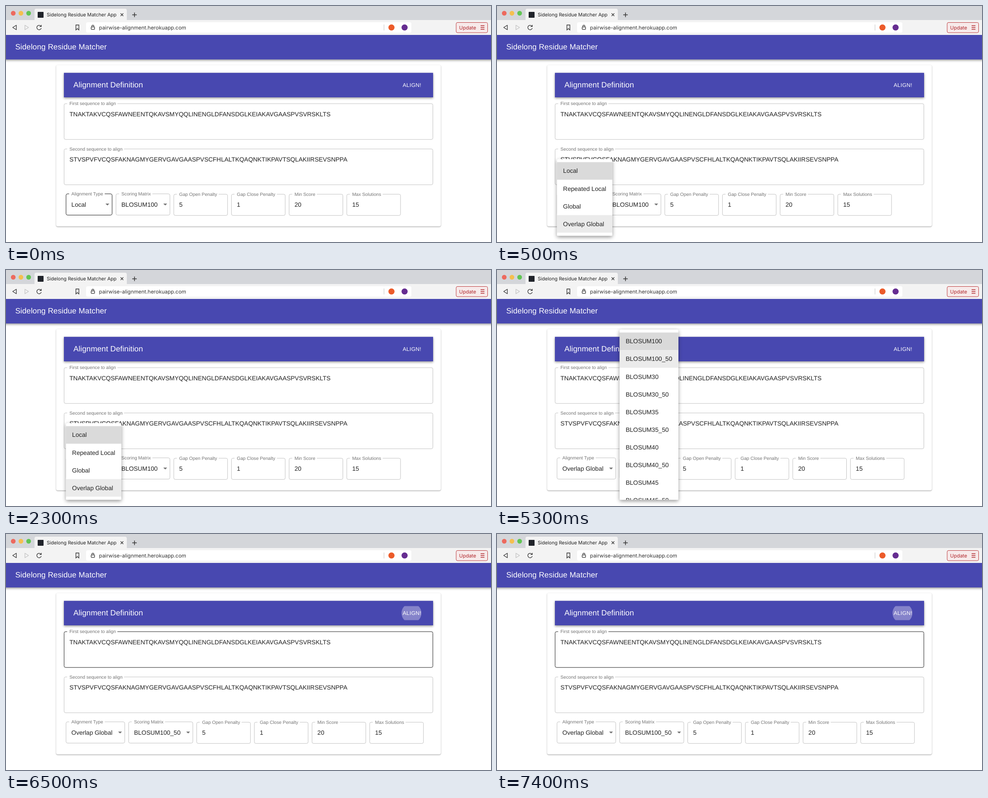
These frames come from a looping animation (1072 px wide and 522 px high, 8000 ms). An HTML page:

```html
<!DOCTYPE html>
<html lang="en">
<head>
<meta charset="utf-8">
<title>Sidelong Residue Matcher</title>
<style>
  html, body { margin: 0; width: 100%; height: 100%; overflow: hidden; background: #fff; }
  svg { display: block; }
  text { font-family: "Liberation Sans", Arial, sans-serif; font-size: 13.6px; fill: #212121;
         text-rendering: geometricPrecision; white-space: pre; }
  .ui { font-family: Inter, sans-serif; }
  .label { font-size: 10.2px; fill: #757575; }
  .title { font-size: 17px; letter-spacing: .0075em; fill: #fff; }
  .button { font-size: 11.9px; letter-spacing: .0286em; fill: #fff; }
  .bar { fill: #4848b0; filter: drop-shadow(0 2px 2.4px rgba(0,0,0,.42)); }
  .card { fill: #fff; filter: drop-shadow(0 1px 1.3px rgba(0,0,0,.4)); }
  .menu { fill: #fff; filter: drop-shadow(0 3px 4px rgba(0,0,0,.42)); }
  .line { fill: none; stroke: #333; stroke-width: 1.3; }
</style>
</head>
<body>
<svg id="stage" width="1072" height="522" viewBox="0 0 1072 522"></svg>
<script>
const stage = document.getElementById('stage');
const pen = document.createElement('canvas').getContext('2d');

const LOOP = 8000;
const STEPS = [
  { at: 0, type: 'Local', matrix: 'BLOSUM100', focus: 'type' },
  { at: 500, type: 'Local', matrix: 'BLOSUM100', menu: 'type' },
  { at: 3500, type: 'Overlap Global', matrix: 'BLOSUM100', menu: 'matrix' },
  { at: 6500, type: 'Overlap Global', matrix: 'BLOSUM100_50', focus: 'first', ripple: true }
];
const TYPES = ['Local', 'Repeated Local', 'Global', 'Overlap Global'];
const MATRICES = ['BLOSUM100', 'BLOSUM100_50'];
for (let n = 30; n <= 45; n += 5) MATRICES.push(`BLOSUM${n}`, `BLOSUM${n}_50`);

const FIRST = 'TNAKTAKVCQSFAWNEENTQKAVSMYQQLINENGLDFANSDGLKEIAKAVGAASPVSVRSKLTS';
const SECOND = 'STVSPVFVCQSFAKNAGMYGERVGAVGAASPVSCFHLALTKQAQNKTIKPAVTSQLAKIIRSEVSNPPA';
const NUMBERS = [['Gap Open Penalty', 5], ['Gap Close Penalty', 1], ['Min Score', 20], ['Max Solutions', 15]];

function measure(s, size) {
  pen.font = `${size}px "Liberation Sans", Arial, sans-serif`;
  return pen.measureText(s).width;
}

const text = (x, y, s, attrs = '') => `<text x="${x}" y="${y}" ${attrs}>${s}</text>`;
const rect = (x, y, w, h, attrs = '') => `<rect x="${x}" y="${y}" width="${w}" height="${h}" ${attrs}/>`;
const dot = (x, y, r, fill) => `<circle cx="${x}" cy="${y}" r="${r}" fill="${fill}"/>`;
const line = (d, attrs = '') => `<path class="line" d="${d}" ${attrs}/>`;

// Outlined box with its label set into the top edge
function field(x, y, w, h, label, value, focused, base = 28) {
  const gap = x + 15.3 + measure(label, 10.2), r = 3.4;
  const edge = `M${gap} ${y}H${x + w - r}q${r} 0 ${r} ${r}V${y + h - r}q0 ${r} ${-r} ${r}` +
    `H${x + r}q${-r} 0 ${-r} ${-r}V${y + r}q0 ${-r} ${r} ${-r}H${x + 6.8}`;
  return `<path d="${edge}" fill="none" stroke="${focused ? '#212121' : '#c2c2c2'}"/>` +
    text(x + 11.9, y + 3.3, label, 'class="label"') + text(x + 11.9, y + base, value);
}

function select(x, w, label, value, focused) {
  return field(x, 415.5, w, 47, label, value, focused) +
    `<path d="M${x + w - 14.6} 437h8.5l-4.25 4.25z" fill="#757575"/>`;
}

function menu(x, y, w, items, hover) {
  const h = 508.3 - y;
  const rows = items.map((s, i) => {
    const top = 6.8 + i * 39.05;
    const fill = i === 0 ? '#dadada' : i === hover ? '#ebebeb' : '#fff';
    return rect(0, top, w, 39.05, `fill="${fill}"`) + text(13.6, top + 24.1, s);
  }).join('');
  return rect(x, y, w, h, 'rx="3.4" class="menu"') +
    `<svg x="${x}" y="${y}" width="${w}" height="${h}" overflow="hidden">${rows}` +
    rect(0, h - 6.8, w, items.length > 4 ? 0 : 6.8, 'fill="#fff"') + '</svg>';
}

function browser() {
  const lights = ['#ed6a5e', '#f5bf4f', '#61c554'].map((c, i) => dot(16 + 17 * i, 16, 5.2, c)).join('');
  return rect(0, 0, 1072, 32, 'fill="#d4d6da"') + rect(0, 31, 1072, 33, 'fill="#f3f3f3"') + lights +
    '<path d="M63 32V10q0-4 4-4H263q4 0 4 4V32z" fill="#f3f3f3"/>' +
    rect(70, 13, 13, 13, 'rx="1" fill="#20232a"') +
    text(90, 23, 'Sidelong Residue Matcher App', 'class="ui" style="font-size:10.6px"') +
    line('M253.3 16.3l6 6m0-6l-6 6') + line('M279 19.5h10m-5-5v10', 'style="stroke-width:1.5"') +
    line('M22.8 42.5v10l-8-5z', 'stroke-linejoin="round"') +
    line('M41.8 42.5v10l8-5z', 'stroke-linejoin="round" style="stroke:#c3c3c3"') +
    line('M77.2 44.6a5 5 0 1 0 .8 4.2M78 41.8v3.6h-3.8') +
    line('M154.5 42h6.6v11l-3.3-3-3.3 3z') +
    rect(177, 36, 719, 23, 'rx="3.5" fill="#fff"') +
    rect(188.3, 46.3, 7.4, 5.4, 'rx="1" class="line"') + line('M189.8 46v-1.5a2.2 2.2 0 0 1 4.4 0v1.5') +
    text(205.5, 51.6, 'pairwise-alignment.herokuapp.com', 'class="ui" style="font-size:11.5px;fill:#333"') +
    rect(835, 41, 1, 13, 'fill="#c4c4c4"') +
    dot(852, 47.5, 6.8, '#ec5b2a') + dot(881, 47.5, 6.8, '#662d91') +
    rect(995, 36.5, 69.5, 22.5, 'rx="3" fill="#f7eaea" stroke="#bd3b3e"') +
    text(1001.5, 51.6, 'Update', 'class="ui" style="font-size:11px;fill:#b0282d"') +
    line('M1049 43.5h8.5m-8.5 4h8.5m-8.5 4h8.5', 'style="stroke:#b0282d"');
}

function scene(step) {
  const x1 = 132.7, gap = 8.6;
  const w1 = Math.max(101.8, 39.1 + measure(step.type, 13.6));
  const x2 = x1 + w1 + gap, w2 = 39.1 + measure(step.matrix, 13.6);
  const x3 = x2 + w2 + gap;

  let out = rect(-10, 64, 1092, 54.2, 'class="bar"') + browser() +
    text(20.4, 96, 'Sidelong Residue Matcher', 'class="title"') +
    rect(111, 130.5, 850, 357, 'rx="3.4" class="card"') +
    rect(128, 147.8, 816, 54.2, 'class="bar"') +
    text(149, 180, 'Alignment Definition', 'class="title"');
  if (step.ripple)
    out += '<svg x="870" y="159.5" width="52" height="31" overflow="hidden">' +
      dot(26.2, 15.5, 22, '#8583ca') + '</svg>';
  out += text(876.8, 179.2, 'ALIGN!', 'class="button"') +
    field(128.4, 216, 815.1, 79.2, 'First sequence to align', FIRST, step.focus === 'first') +
    field(128.4, 316.2, 815.1, 79.2, 'Second sequence to align', SECOND) +
    select(x1, w1, 'Alignment Type', step.type, step.focus === 'type') +
    select(x2, w2, 'Scoring Matrix', step.matrix);
  NUMBERS.forEach(([label, value], i) => {
    out += field(x3 + i * 127.45, 416.3, 118.8, 47, label, value);
  });
  if (step.menu === 'type') out += menu(132.5, 338.6, 122.4, TYPES, 3);
  if (step.menu === 'matrix') out += menu(x2 - .2, 131.5, 130, MATRICES, 1);
  return out;
}

let shown = null;
function tick() {
  const t = performance.now() % LOOP;
  const step = STEPS.findLast(s => s.at <= t);
  if (step !== shown) {
    stage.innerHTML = scene(step);
    shown = step;
  }
  requestAnimationFrame(tick);
}
tick();
</script>
</body>
</html>
```
